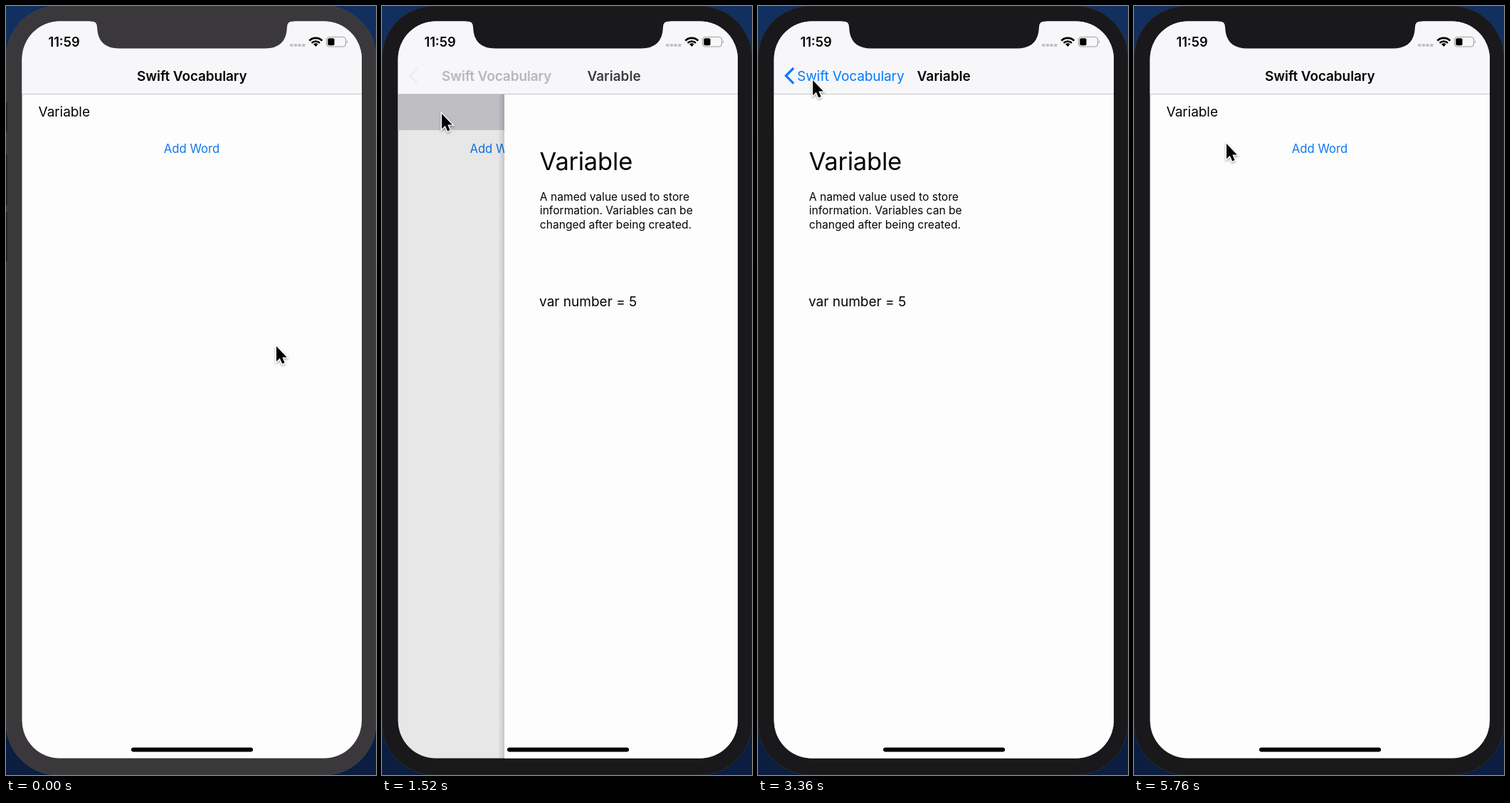
An HTML page that plays this animation: 520x1078 px, repeating every 5800 ms.

```html
<!DOCTYPE html>
<html lang="en">
<head>
<meta charset="utf-8">
<title>Swift Vocabulary</title>
<style>
  html, body { margin: 0; width: 100%; height: 100%; overflow: hidden; background: #0c2148; }
  svg { display: block; width: 520px; height: 1078px; }
  text { font: 400 19px Inter, "Open Sans", sans-serif; fill: #050505; white-space: pre; }
  .semi { font-weight: 600; }
  .mid { text-anchor: middle; }
  .blue { fill: #007aff; }
  .small { font-size: 15.6px; }
</style>
</head>
<body>
<svg viewBox="0 0 520 1078" xmlns="http://www.w3.org/2000/svg">
  <defs>
    <clipPath id="screen"><rect x="22.5" y="21.5" width="477.5" height="1033" rx="53"/></clipPath>
    <clipPath id="content"><rect x="22" y="124" width="478" height="932"/></clipPath>
    <linearGradient id="desk" x2="0" y2="1">
      <stop stop-color="#12305f"/><stop offset="1" stop-color="#0b1d40"/>
    </linearGradient>
    <linearGradient id="edge">
      <stop stop-color="#000" stop-opacity="0"/><stop offset="1" stop-color="#000" stop-opacity=".16"/>
    </linearGradient>
    <filter id="soft" x="-50%" y="-50%" width="200%" height="200%">
      <feDropShadow dx="0" dy="1.5" stdDeviation="1.5" flood-opacity=".4"/>
    </filter>
  </defs>

  <rect width="520" height="1078" fill="url(#desk)"/>
  <rect id="bezel" x="0" y="0" width="520" height="1078" rx="73"/>
  <path d="M0 135h1.5v41H0zM0 208h1.5v71H0zM0 289h1.5v69H0z" fill="#1b1a1c"/>

  <g clip-path="url(#screen)">
    <rect x="22" y="21" width="479" height="1035" fill="#fefdfe"/>

    <g clip-path="url(#content)">
      <g id="list">
        <rect id="row" x="22" y="124" width="478" height="50" fill="#d1d0d5"/>
        <text x="45.6" y="154.7" letter-spacing="-.05">Variable</text>
        <text class="mid" x="261" y="205.5" style="font-size:16.7px;fill:#0a7af0">Add Word</text>
      </g>
      <rect id="dim" x="22" y="124" width="478" height="932"/>
      <g id="detail">
        <rect id="shade" x="13" y="124" width="9" height="932" fill="url(#edge)"/>
        <rect x="22" y="124" width="479" height="932" fill="#fefdfe"/>
        <text x="71.5" y="230" font-style="italic" style="font-size:34.5px" letter-spacing="-.2">Variable</text>
        <text class="small" x="71.8" y="273">A named value used to store</text>
        <text class="small" x="71.8" y="292.4">information. Variables can be</text>
        <text class="small" x="71.8" y="311.8">changed after being created.</text>
        <text x="71" y="421">var number = 5</text>
      </g>
    </g>

    <rect x="22" y="21" width="479" height="102.5" fill="#f7f6f9"/>
    <rect x="22" y="123" width="479" height="1" fill="#c6c5c9"/>
    <path id="chevron" d="M50 87L39.3 97.8L50 108.6" fill="none" stroke="#007aff" stroke-width="3.2"/>
    <text id="backLabel" class="mid blue" x="130.3" y="104.5" letter-spacing="-.08">Swift Vocabulary</text>
    <text id="listTitle" class="mid semi" x="261.3" y="104.5" letter-spacing="-.1">Swift Vocabulary</text>
    <text id="detailTitle" class="mid semi" x="261.2" y="104.5">Variable</text>

    <text class="mid semi" x="81.5" y="56.5" style="font-size:18.3px">11:59</text>
    <g fill="#c3c2c5">
      <rect x="399" y="53" width="4.4" height="4" rx="1.2"/>
      <rect x="404.7" y="53" width="4.4" height="4" rx="1.2"/>
      <rect x="410.4" y="53" width="4.4" height="4" rx="1.2"/>
      <rect x="416.1" y="53" width="4.4" height="4" rx="1.2"/>
    </g>
    <g fill="none" stroke="#000" stroke-width="2.6">
      <path d="M426.3 48.6A12.7 12.7 0 0 1 444.3 48.6"/>
      <path d="M429.6 51.9A8 8 0 0 1 441 51.9"/>
    </g>
    <path d="M435.3 57L432 53.6A4.8 4.8 0 0 1 438.6 53.6Z"/>
    <rect x="450.5" y="43.5" width="27" height="13.5" rx="4" fill="none" stroke="#a09fa2" stroke-width="1.2"/>
    <rect x="452.3" y="45.3" width="9.2" height="9.9" rx="2"/>
    <path d="M479 48q2 2.2 0 4.6z" fill="#a09fa2"/>
    <rect x="176" y="1039.5" width="171" height="6" rx="3"/>
  </g>

  <path id="notch" d="M118 20H405V21.5H403Q395 21.5 395 29.5Q394 59.5 364 59.5H159Q129 59.5 128 29.5Q128 21.5 120 21.5H118Z"/>

  <g id="cursor" filter="url(#soft)">
    <path d="M1 1V22.2L5.8 17.8L9.2 25.6L12.6 24.1L9.3 16.4H15.8Z" stroke="#fff" stroke-width="2.6" paint-order="stroke"/>
  </g>
</svg>

<script>
const LOOP = 5800, TICK = 40;
const FOCUS = 1240, PRESS = 1320, PUSH = 1393, POP = 4429;
const WIDTH = 478, STIFFNESS = 0.0187;

const $ = id => document.getElementById(id);
const clamp = v => Math.min(1, Math.max(0, v));
const move = (id, x, y = 0) => $(id).setAttribute('transform', `translate(${x.toFixed(2)} ${y.toFixed(2)})`);
const fade = (id, a) => $(id).setAttribute('opacity', clamp(a).toFixed(3));

const easeIn = u => u ** 1.35;
const easeOut = u => 1 - (1 - u) ** 2;
const smooth = u => u * u * (3 - 2 * u);

// time, x, y, easing towards this stop
const pointer = [
  [0, 379, 476],
  [600, 130, 193, easeIn],
  [860, 83, 150, easeOut],
  [2560, 83, 150, smooth],
  [2960, 77, 105, smooth],
  [3200, 76, 103, smooth],
  [4540, 76, 103, smooth],
  [5160, 129, 192, smooth],
  [LOOP, 129, 192, smooth]
];

function pointerAt(t) {
  const i = pointer.findIndex(stop => stop[0] > t);
  const [t0, x0, y0] = pointer[i - 1], [t1, x1, y1, ease] = pointer[i];
  const u = ease((t - t0) / (t1 - t0));
  return [x0 + (x1 - x0) * u, y0 + (y1 - y0) * u];
}

// Critically damped spring from 0 to 1
function spring(ms) {
  const k = STIFFNESS * Math.max(0, ms);
  return 1 - (1 + k) * Math.exp(-k);
}

function render(t) {
  const focused = t >= FOCUS;
  const color = focused ? '#19181a' : '#3a383a';
  $('bezel').setAttribute('fill', color);
  $('notch').setAttribute('fill', color);
  $('bezel').setAttribute('stroke', focused ? '#2a2d33' : '#444247');

  // 1 shows the list, 0 shows the detail page
  const away = clamp(1 - spring(t - PUSH) + spring(t - POP));
  const bar = away ** 1.25;

  move('detail', WIDTH * away);
  move('list', -0.3 * WIDTH * (1 - away));
  fade('dim', 0.125 * (1 - away));
  fade('shade', Math.min(1, away * 5) * (1 - away) * 1.3);
  fade('row', t < PRESS ? 0 : 1 - (t - POP) / 350);

  move('backLabel', 131 * bar);
  move('listTitle', -131 * (1 - bar));
  move('detailTitle', 276 * bar);
  fade('backLabel', 1 - 4 * bar);
  fade('chevron', 1 - 4 * bar);
  fade('listTitle', bar);
  fade('detailTitle', 1 - bar);

  move('cursor', ...pointerAt(t));
}

function frame() {
  const t = performance.now() % LOOP;
  render(Math.floor(t / TICK) * TICK);
  requestAnimationFrame(frame);
}
frame();
</script>
</body>
</html>
```
